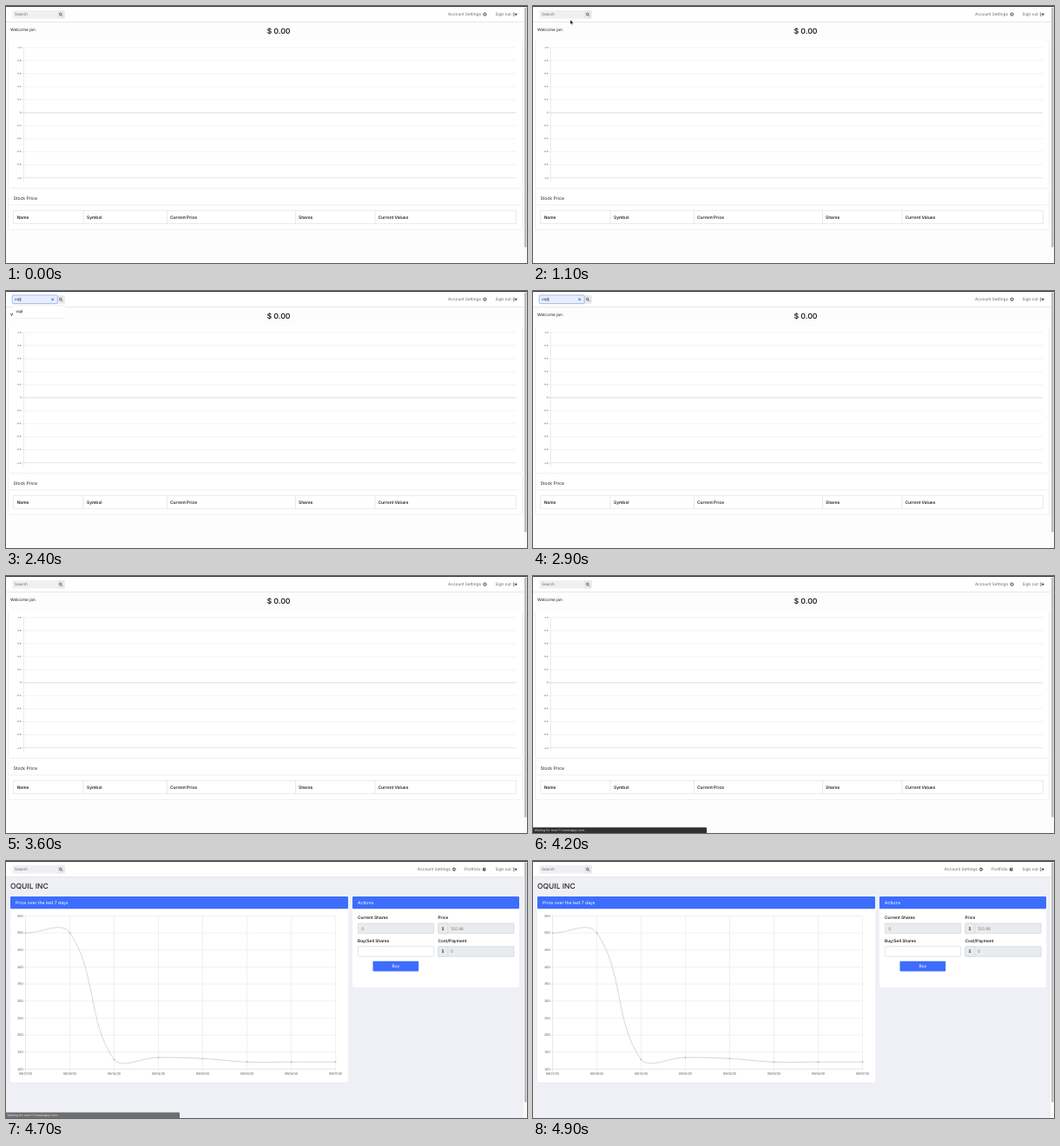
An HTML page that plays this animation: 600x297 px, repeating every 5 s.

```html
<!DOCTYPE html>
<html lang="en">
<head>
<meta charset="utf-8">
<title>Stock dashboard</title>
<style>
html, body { margin: 0; height: 100%; overflow: hidden; background: #fff; }
svg { display: block; width: 100vw; height: 100vh; }
text { font-family: Inter, "Open Sans", sans-serif; fill: #222; text-rendering: geometricPrecision; white-space: pre; }
.axis text { font-family: "Liberation Sans", Arial, sans-serif; fill: #555; }
.b { font-weight: 600; }
.nav { fill: #666; }
.w { fill: #fff; }
.card { filter: drop-shadow(0 .5px .7px #0003); }
</style>
</head>
<body>
<svg id="stage" viewBox="0 0 600 297"></svg>
<script>
const BLUE = '#3d6dfd';
const $ = id => document.getElementById(id);
const range = n => [...Array(n).keys()];
const text = (x, y, s, size = 4.8, attrs = '') => `<text x="${x}" y="${y}" font-size="${size}" ${attrs}>${s}</text>`;
const rect = (x, y, w, h, fill, attrs = '') => `<rect x="${x}" y="${y}" width="${w}" height="${h}" fill="${fill}" ${attrs}/>`;
const path = (d, stroke, width = .6, attrs = '') => `<path d="${d}" fill="none" stroke="${stroke}" stroke-width="${width}" ${attrs}/>`;
const group = (id, body, attrs = '') => `<g id="${id}" ${attrs}>${body}</g>`;
const card = (x, y, w, h) => rect(x, y, w, h, '#fff', 'class="card" rx="1"');

const gear = x =>
  `<circle cx="${x}" cy="9.6" r="1.3" fill="none" stroke="#555" stroke-width="1"/>` +
  `<circle cx="${x}" cy="9.6" r="2" fill="none" stroke="#555" stroke-width=".8" stroke-dasharray=".8 .77"/>`;
const pie = `<circle cx="550.8" cy="9.7" r="2.1" fill="#555"/>` + path('M550.8 7.2V9.7H553.3', '#fff', .5);
const exit = path('M585.6 7.9H584.3V11.5H585.6', '#555', .6) +
  `<path d="M585.6 9.1H586.8V7.8L588.8 9.7L586.8 11.6V10.3H585.6Z" fill="#555"/>`;
const signOut = text(563.5, 11.3, 'Sign out', 4.7, 'class="nav"') + exit;

function dashboard() {
  const grid = range(11).map(i => {
    const y = 48 + i * 15.05, v = 1 - i * .2;
    const label = i === 5 ? '0' : v.toFixed(1);
    return path(`M18 ${y}H587`, i === 5 ? '#ccc' : i === 10 ? '#ddd' : '#ececee', .7) +
      text(17.5, y + 1, label, 3, 'text-anchor="end"');
  }).join('');
  const heads = [[12.7, 'Name'], [93, 'Symbol'], [189, 'Current Price'], [337, 'Shares'], [428.5, 'Current Values']];
  return rect(0, 18.5, 596, 279, '#fdfdfe') +
    text(509, 11.3, 'Account Settings', 4.7, 'class="nav"') + gear(551.5) + signOut +
    text(5, 28.7, 'Welcome jan', 4.75) +
    text(314, 32, '$ 0.00', 8.6, 'text-anchor="middle" class="b"') +
    card(2.5, 41, 592, 169.5) +
    `<g class="axis">${grid}${path('M20.3 48V203', '#ddd')}</g>` +
    card(2.5, 213, 592, 45.5) +
    text(8.5, 224.4, 'Stock Price', 5.1) + path('M2.5 230H594.5', '#e6e6ea') +
    path('M8.6 236.3H587.4V251.4H8.6ZM89 236.3V251.4M185.5 236.3V251.4M333.5 236.3V251.4M425 236.3V251.4', '#dee0e4', .7) +
    heads.map(([x, s]) => text(x, 245.7, s, 4.85, 'class="b"')).join('');
}

// Cardinal spline whose control points stay inside the plot area
function spline(points, tension, top, bottom) {
  const handles = points.map((p, i) => {
    const a = points[i - 1] || p, b = points[i + 1] || p;
    const da = Math.hypot(p[0] - a[0], p[1] - a[1]), db = Math.hypot(b[0] - p[0], b[1] - p[1]);
    const at = k => [p[0] + k * (b[0] - a[0]), Math.min(bottom, Math.max(top, p[1] + k * (b[1] - a[1])))];
    return { before: at(-tension * da / (da + db)), after: at(tension * db / (da + db)) };
  });
  return 'M' + points[0] + points.slice(1).map((p, i) => `C${handles[i].after} ${handles[i + 1].before} ${p}`).join('');
}

function priceChart() {
  const top = 63.5, bottom = 240.5, left = 22.5, step = 51;
  const yOf = v => bottom - (v - 100) / 450 * (bottom - top);
  const days = ['08/27', '08/28', '08/31', '09/01', '09/02', '09/03', '09/04', '09/07'];
  const points = [500, 500, 128, 134, 131, 121, 121, 120.96].map((v, i) => [left + i * step, yOf(v)]);
  const rows = range(10).map(i => {
    const v = 100 + i * 50, y = yOf(v);
    return path(`M20 ${y}H379.5`, i ? '#e8e8ea' : '#d8d8da') + text(19.5, y + 1.3, v, 3.8, 'text-anchor="end"');
  });
  const columns = days.map((d, i) => {
    const x = left + i * step;
    return path(`M${x} ${top}V243`, i ? '#e8e8ea' : '#d8d8da') + text(x, 247.3, d + '/20', 3.8, 'text-anchor="middle"');
  });
  const dots = points.map(([x, y]) => `<circle cx="${x}" cy="${y}" r=".9" fill="#bbb"/>`);
  return `<g class="axis">${[...rows, ...columns].join('')}</g>` +
    path(spline(points, .4, top, bottom), '#ccc', .8) + dots.join('');
}

function field(x, y, label, value, fill, prefix) {
  const box = `stroke="#ced2d8" stroke-width=".6" rx="1"`;
  return text(x, y - 4.7, label, 4.8, 'class="b"') +
    rect(x + .3, y, 87.4, 11.7, fill, box) +
    (prefix ? rect(x + .3, y, 11, 11.7, '#e9ecef', box) + text(x + 4, y + 7.6, '$') : '') +
    text(x + (prefix ? 14.5 : 4.2), y + 7.6, value, 4.8, 'style="fill:#777"');
}

function stockPage() {
  const panel = (x, w, h, title) => card(x, 41, w, h) + rect(x, 41, w, 14.3, BLUE, 'rx="1"') +
    text(x + 6, 50, title, 5.1, 'class="w"');
  return rect(0, 18.5, 596, 279, '#eff0f5') +
    text(473.8, 11.3, 'Account Settings', 4.7, 'class="nav"') + gear(516) +
    text(528, 11.3, 'Portfolio', 4.7, 'class="nav"') + pie + signOut +
    text(5, 32, 'OQUIL INC', 8.5, 'font-weight="500"') +
    panel(5, 389, 215.5, 'Price over the last 7 days') + priceChart() +
    panel(399, 192, 105, 'Actions') +
    field(405, 72, 'Current Shares', '0', '#e9ecef') +
    field(497.5, 72, 'Price', '120.96', '#e9ecef', true) +
    field(405, 98.7, 'Buy/Sell Shares', '', '#fff') +
    field(497.5, 98.7, 'Cost/Payment', '0', '#e9ecef', true) +
    rect(422.5, 115.7, 52.7, 11.8, BLUE, 'rx="1"') +
    text(448.8, 123.4, 'Buy', 4.9, 'text-anchor="middle" class="w"');
}

$('stage').innerHTML =
  rect(0, 0, 600, 297, '#fff') +
  group('home', dashboard()) + group('stock', stockPage()) +
  path('M0 18.5H596', '#dedee2', .7) +
  rect(7.5, 5, 60, 9.4, '#f0f0f3', 'rx="1"') + rect(59, 5, 8.7, 9.4, '#e9e9ed', 'rx="1"') +
  rect(7.2, 4.8, 52, 9.8, '#e8eefc', 'id="focus" stroke="#a3bbf6" stroke-width="1" rx="1"') +
  `<circle cx="62.7" cy="9.4" r="1.3" fill="none" stroke="#333" stroke-width=".7"/>` + path('M63.6 10.4L65 11.8', '#333', .8) +
  text(10, 11.3, '', 4.5, 'id="query"') +
  path('M0 7.6V12.2', '#222', .5, 'id="caret"') +
  path('M52.3 8.4L54.9 11M54.9 8.4L52.3 11', '#2b4a9b', .8, 'id="clear"') +
  group('list', rect(8, 16.5, 60, 26, '#fff', 'id="listBox" class="card" rx="1"') +
    text(11.5, 24.5, 'oqil', 4.4, 'font-weight="500"') + text(11.5, 35.8, 'tzfo', 4.4, 'id="second" font-weight="500"')) +
  rect(596, 1, 4, 296, '#fafafa') + rect(597, 1.5, 2.6, 277.5, '#bdbdc1', 'rx="1.3"') +
  rect(0, 0, 600, 1, '#3c3c40') +
  group('status', '<path d="M0 290.5H199a1 1 0 0 1 1 1V297H0Z" fill="#2f2f32"/>' +
    text(1.5, 295.2, 'Waiting for mod-1.herokuapp.com...', 3.6, 'style="fill:#d8d8da"')) +
  '<path id="pointer" d="M0 0V5L1.2 4L2 5.8L2.9 5.4L2.1 3.7H3.6Z" fill="#111" stroke="#fff" stroke-width=".3"/>';

const show = (id, on) => $(id).style.display = on ? '' : 'none';

function draw(t) {
  const within = (a, b) => t >= a && t < b;
  show('home', t < 4500);
  show('stock', t >= 4500);

  const typed = within(1800, 3600) ? 'oqil'.slice(0, [1800, 2000, 2400, 2900].filter(k => t >= k).length) : '';
  const focused = within(1300, 3200);
  const query = $('query');
  query.textContent = typed || (focused ? '' : 'Search');
  query.style.fill = typed ? '#222' : '#666';
  show('focus', focused);
  show('clear', typed);
  show('caret', focused);
  $('caret').setAttribute('transform', `translate(${10.3 + (typed ? query.getComputedTextLength() : 0)})`);

  show('list', within(1400, 2900));
  show('second', t < 2000);
  $('listBox').setAttribute('height', t < 2000 ? 26 : 15);

  show('status', within(4200, 4900));
  $('status').style.opacity = t < 4700 ? 1 : (4900 - t) / 300;

  const glance = within(100, 200);
  const rest = Math.max(0, 1 - (t - 600) / 500) ** 2;
  show('pointer', glance || within(600, 1300));
  $('pointer').setAttribute('transform', glance ? 'translate(579 120)' : `translate(${43 + 42 * rest} ${16 + 15 * rest})`);
}

function tick() {
  draw(Math.floor(performance.now() % 5000 / 100) * 100);
  requestAnimationFrame(tick);
}
tick();
</script>
</body>
</html>
```
